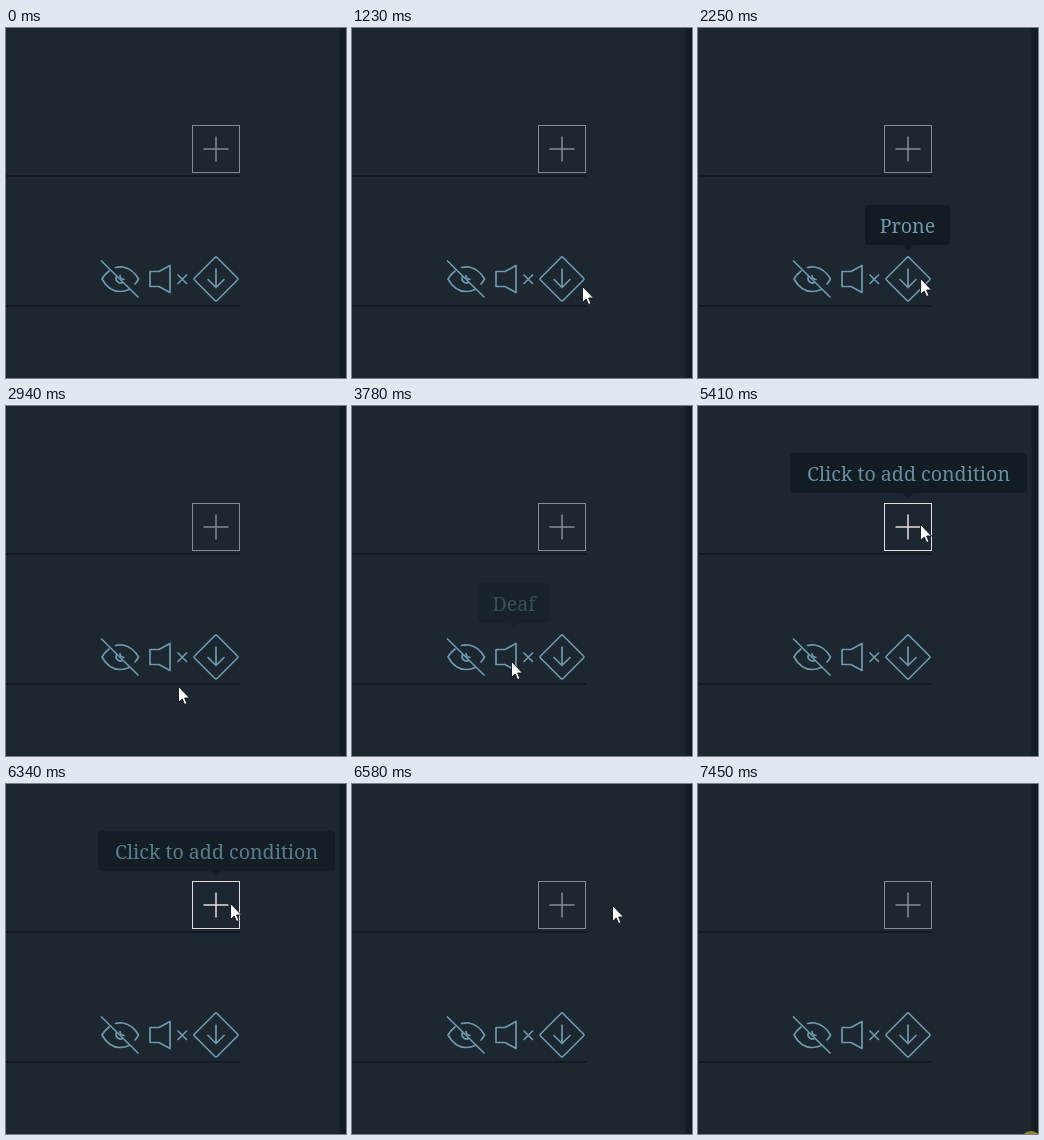
Animation, 340 px wide and 350 px high, one loop 7530 ms. Source, as an HTML page:

```html
<!DOCTYPE html>
<html lang="en">
<head>
<meta charset="utf-8">
<title>Condition tooltips</title>
<style>
  html, body { margin: 0; width: 100%; height: 100%; overflow: hidden; background: #1c272f; }
  svg { display: block; width: 340px; height: 350px; }
  text { font: 19.6px "Noto Serif", serif; fill: #6d9aab; text-anchor: middle; }
  .icon { fill: none; stroke: #6a9bad; stroke-width: 1.7; stroke-linecap: round; stroke-linejoin: round; }
  .tip { fill: #121b22; }
</style>
</head>
<body>
<svg viewBox="0 0 340 350">
  <defs>
    <linearGradient id="edge">
      <stop offset="0" stop-color="#1c272f"/>
      <stop offset=".4" stop-color="#111c25"/>
      <stop offset="1" stop-color="#111c25"/>
    </linearGradient>
  </defs>
  <rect width="340" height="350" fill="#1c272f"/>
  <rect x="332" width="8" height="350" fill="url(#edge)"/>
  <path d="M0 148H234M0 278H234" stroke="#131b22" stroke-width="2"/>

  <g id="add" fill="none" stroke="#858c91">
    <rect x="186.5" y="97.5" width="47" height="47"/>
    <path d="M197.5 121H222.5M210 108.5V133.5" stroke-width="1.5"/>
  </g>

  <g class="icon">
    <path d="M95.5 233L132 269"/>
    <path d="M103 243Q98 247 96 251Q103 263.500 114 263.500Q119 263.500 123 261.500"/>
    <path d="M109.500 239.500Q113 238.500 117 239Q127 241 132.500 251Q131 254 129 256"/>
    <path d="M110.500 248.500A4.500 4.500 0 0 0 116.500 254.500M114 247.500Q114 251 118 251.500"/>
    <path d="M144 243.500H153L164 237.500V264.500L153 258.500H144Z"/>
    <path d="M172 247L180.500 255.500M180.500 247L172 255.500"/>
    <path d="M209 229.500Q210 228.500 211 229.500L231.500 250Q232.500 251 231.500 252L211 272.500Q210 273.500 209 272.500L188.500 252Q187.500 251 188.500 250Z"/>
    <path d="M210 241V259.500M202 251.500L210 259.500L218 251.500"/>
  </g>

  <g id="tips"></g>
  <circle id="ring" cx="333" cy="358" r="11" fill="#8b8a1c"/>
  <path id="cursor" d="M.5 .5V16.500L4.200 13L6.600 18.500L9 17.500L6.600 12H11.500Z" fill="#fff" stroke="#10161b" stroke-width=".9"/>
</svg>
<script>
const LOOP = 7530;
const $ = id => document.getElementById(id);
const lin = p => p, easeIn = p => p * p, easeOut = p => 1 - (1 - p) ** 2;

// Each move: time of first step, time of last step, step count, then legs.
// Leg: start time, end time, from, to, easing for x and y.
const moves = [
  { start: 830, end: 1390, n: 8, legs: [
    [750, 1390, [352, 372], [222, 250], easeOut, easeOut]] },
  { start: 2550, end: 3240, n: 10, legs: [
    [2472, 2940, [222, 250], [171, 280], lin, lin],
    [2940, 3240, [171, 280], [159, 255], easeOut, easeOut]] },
  { start: 4320, end: 4790, n: 7, legs: [
    [4242, 4470, [159, 255], [197, 191], easeIn, easeIn],
    [4470, 4790, [197, 191], [222, 118], easeOut, easeOut]] },
  { start: 6340, end: 7060, n: 10, legs: [
    [6260, 6580, [222, 118], [260, 121], easeIn, lin],
    [6580, 7060, [260, 121], [335, 341], lin, p => p ** 1.3]] },
];

// Opacity steps are [time, value] pairs held until the next one.
const tips = [
  { label: "Prone", x: 167, y: 177, w: 85, tail: 210, fade: [
    [2010, .25], [2090, .55], [2170, .85], [2250, 1], [2700, .75], [2780, .45], [2860, .15], [2940, 0]] },
  { label: "Deaf", x: 126, y: 177, w: 72, tail: 162, fade: [
    [3780, .35], [3850, .75], [3930, 1], [4550, .75], [4630, .45], [4710, .15], [4790, 0]] },
  { label: "Click to add condition", x: 92, y: 47, w: 237, tail: 210, fade: [
    [5410, .9], [5570, 1], [6340, .75], [6420, .45], [6500, .15], [6580, 0]] },
];
const hover = [[4630, .5], [4710, 1], [6420, .6], [6500, .25], [6580, 0]];

for (const tip of tips) {
  const { label, x, y, w, tail } = tip;
  $("tips").insertAdjacentHTML("beforeend", `<g>
    <rect class="tip" x="${x}" y="${y}" width="${w}" height="40" rx="4"/>
    <path class="tip" d="M${tail - 6} ${y + 39.5}h12l-6 6z"/>
    <text x="${x + w / 2}" y="${y + 28}">${label}</text></g>`);
  tip.node = $("tips").lastElementChild;
}

function held(steps, t) {
  let value = 0;
  for (const [at, v] of steps) if (t >= at) value = v;
  return value;
}

function place(t) {
  const move = moves.findLast(m => t >= m.start);
  if (!move) return [400, 400];
  const step = (move.end - move.start) / (move.n - 1);
  const k = Math.min(move.n - 1, Math.floor((t - move.start) / step + .1));
  const at = move.start + k * step;
  const [t0, t1, a, b, ex, ey] = move.legs.find(l => at <= l[1] + .01) || move.legs.at(-1);
  const p = Math.min(1, Math.max(0, (at - t0) / (t1 - t0)));
  return [a[0] + (b[0] - a[0]) * ex(p), a[1] + (b[1] - a[1]) * ey(p)].map(Math.round);
}

const show = (node, on) => node.setAttribute("visibility", on ? "visible" : "hidden");
const mix = (a, b, p) => Math.round(a + (b - a) * p);

function draw(t) {
  $("cursor").setAttribute("transform", `translate(${place(t)})`);
  show($("cursor"), t >= 830 && t < 7140);
  show($("ring"), t >= 7450);
  for (const tip of tips) tip.node.setAttribute("opacity", held(tip.fade, t));
  const h = held(hover, t);
  $("add").setAttribute("stroke", `rgb(${mix(133, 228, h)},${mix(140, 220, h)},${mix(145, 222, h)})`);
}

const begin = performance.now();
function tick() {
  draw((performance.now() - begin) % LOOP);
  requestAnimationFrame(tick);
}
tick();
</script>
</body>
</html>
```
